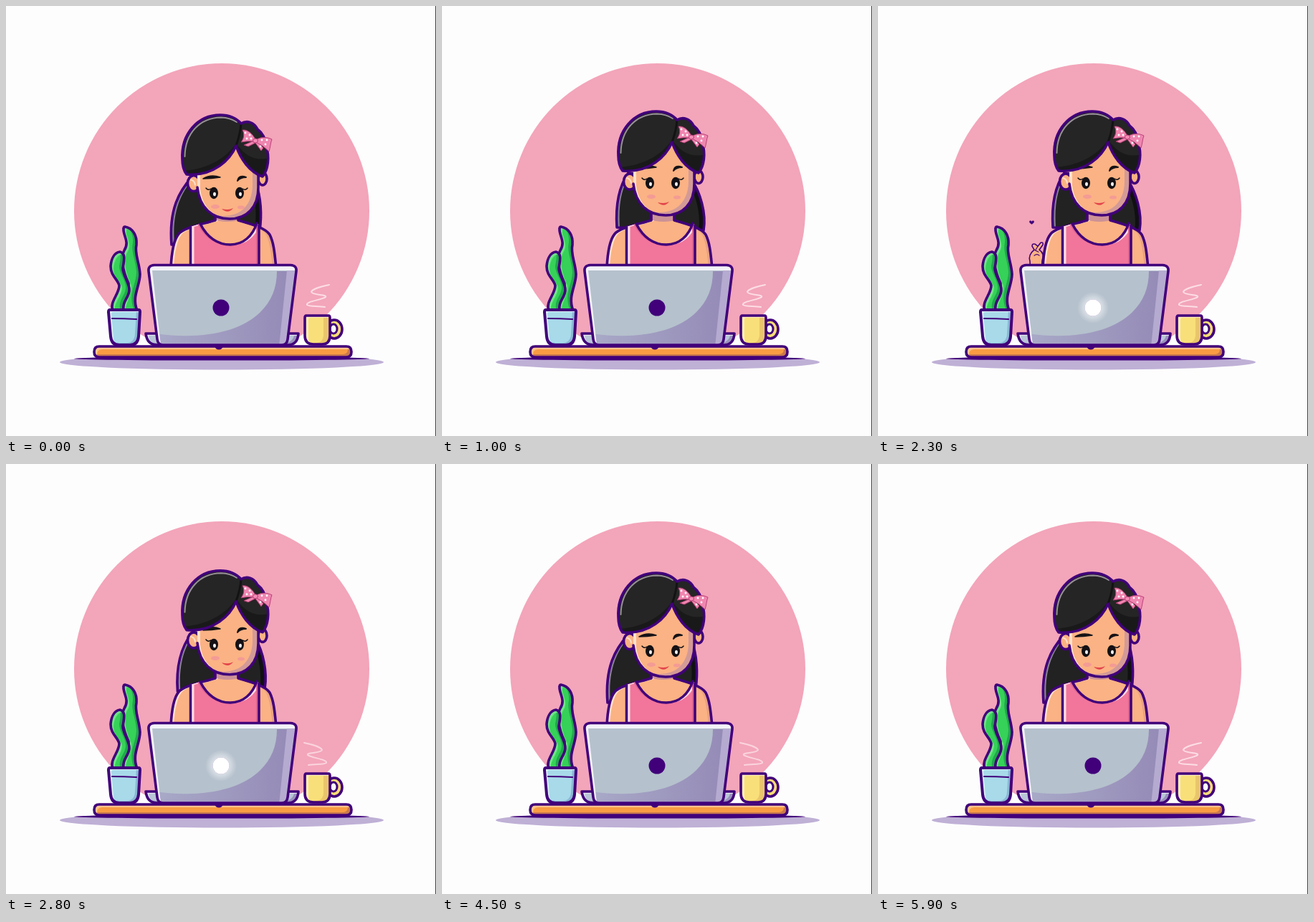
An HTML page with a canvas that plays this animation: 600 px wide and 600 px high, repeating every 6 s.

```html
<!DOCTYPE html>
<html lang="en">
<head>
<meta charset="utf-8">
<title>Working at the laptop</title>
<style>
html, body { margin: 0; width: 100%; height: 100%; overflow: hidden; background: #fdfdfd; }
canvas { display: block; width: 600px; height: 600px; }
</style>
</head>
<body>
<canvas id="stage" width="600" height="600"></canvas>
<script>
const ctx = document.getElementById('stage').getContext('2d');
const LOOP = 6000, STEP = 100;
const PAPER = '#fdfdfd', INK = '#41007a';
const SKIN = '#fbb284', SKIN_LIGHT = '#fee0cc', SKIN_SHADE = '#d39a97';

const ramp = (t, a, b) => Math.min(1, Math.max(0, (t - a) / (b - a)));
const ease = (t, a, b) => { const u = ramp(t, a, b); return u * u * (3 - 2 * u); };
const pulse = (t, a, b, c, d) => ease(t, a, b) - ease(t, c, d);

function shape(d, fill, stroke, width = 4) {
  const path = new Path2D(d);
  if (fill) { ctx.fillStyle = fill; ctx.fill(path); }
  if (stroke) { ctx.strokeStyle = stroke; ctx.lineWidth = width; ctx.stroke(path); }
}

function oval(x, y, rx, ry, fill, stroke, width = 4) {
  ctx.beginPath();
  ctx.ellipse(x, y, rx, ry, 0, 0, Math.PI * 2);
  if (fill) { ctx.fillStyle = fill; ctx.fill(); }
  if (stroke) { ctx.strokeStyle = stroke; ctx.lineWidth = width; ctx.stroke(); }
}

function group(dx, dy, draw) {
  ctx.save();
  ctx.translate(dx, dy);
  draw();
  ctx.restore();
}

function inside(d, draw) {
  ctx.save();
  ctx.clip(new Path2D(d));
  draw();
  ctx.restore();
}

// Fills the part of a shape that lies outside a shifted copy of itself.
function rim(d, color, dx, dy) {
  inside(d, () => {
    const outer = new Path2D('M0 0H600V600H0Z');
    outer.addPath(new Path2D(d), { e: dx, f: dy });
    ctx.fillStyle = color;
    ctx.fill(outer, 'evenodd');
  });
}

function solid(d, fill, light, shade, width = 4) {
  shape(d, fill);
  rim(d, shade, -5, -3);
  rim(d, light, 4, 3);
  shape(d, null, INK, width);
}

function backdrop() {
  ctx.fillStyle = PAPER;
  ctx.fillRect(0, 0, 600, 600);
  oval(301, 286, 206, 206, '#f3a5ba');
  oval(301, 497, 226, 10.5, '#bfb0d6');
  oval(301, 492, 206, 2.6, INK);
}

function desk() {
  const top = 'M130 475H475Q482 475 482 482.5Q482 490 475 490H130Q123 490 123 482.5Q123 475 130 475Z';
  shape(top, '#f99c43');
  rim(top, '#c9794e', -5, -4);
  rim(top, '#fdc48d', 4, 4);
  shape(top, null, INK, 3.6);
}

function plant() {
  const back = 'M166 308C177 310 183 320 182 333C179 346 186 357 187 374C187 391 175 405 183 425H162C163 410 172 399 171 387C162 368 160 350 165 341C173 329 163 320 164 311Q164 308 166 308Z';
  const front = 'M159 343C167 345 165 354 163 366C163 376 173 387 172 397C171 408 162 412 164 425H149C144 413 158 402 158 390C156 381 146 377 146 363C147 351 152 344 159 343Z';
  solid(back, '#36d158', '#72e488', '#20a84b', 3.6);
  solid(front, '#36d158', '#72e488', '#20a84b', 3.6);
  const pot = 'M145 424H185Q187 424 187 427L185 461Q184 473 173 473H158Q147 473 146 461L143 427Q143 424 145 424Z';
  solid(pot, '#a8daea', '#dff3f8', '#89b8d4');
  shape('M148 436Q165 436 182 437', null, INK, 2.2);
}

function mug() {
  oval(458, 451, 11, 13, '#f8dc78', INK, 3.6);
  oval(457, 450.5, 5, 6.5, PAPER, INK, 3);
  const cup = 'M419 432H450Q452 432 452 435V460Q452 472 441 472H429Q417 472 417 460V435Q417 432 419 432Z';
  shape(cup, '#f9df79');
  rim(cup, '#e9c56b', -9, -2);
  rim(cup, '#fff0b9', 5, 3);
  shape(cup, null, INK, 3.6);
}

function steam(t) {
  const phase = (t * 7 / LOOP) % 1;
  const mirrored = phase > 0.225 && phase < 0.6;
  ctx.save();
  if (mirrored) {
    ctx.translate(867, 0);
    ctx.scale(-1, 1);
  }
  ctx.globalAlpha = mirrored ? 0.75 : 0.9;
  shape('M451 389C441 391 427 395 426 399C428 404 448 402 446 406C442 410 418 412 420 417C424 420 436 418 445 420', null, '#fde4ea', 2);
  ctx.restore();
}

function laptop(t) {
  solid('M195 457H408Q407 473 393 473H211Q197 473 195 457Z', '#b8c5d6', '#e7edf3', '#9a91bc', 3.6);
  const lid = 'M207 361.5H397Q406 362 405 370L393 465Q392 473 385 473H219Q212 473 211 465L199 370Q198 362 207 361.5Z';
  shape(lid, '#b5c1cd');
  inside(lid, () => {
    const shadow = ctx.createLinearGradient(216, 0, 394, 0);
    shadow.addColorStop(0, '#a8a8c7');
    shadow.addColorStop(1, '#958bb7');
    shape('M209 457C270 466 326 456 355 427C370 412 378 394 378 370H410V480H209Z', shadow);
    shape('M196 360H408V369H204L216 473H208Z', '#f2f2f7');
    shape('M392 369H407L394 475H381Z', '#b5abd0');
  });
  shape(lid, null, INK, 3.6);

  const glow = pulse(t, 1600, 2200, 3400, 4200);
  oval(300, 421, 11.5, 11.5, INK);
  ctx.save();
  ctx.globalAlpha = glow;
  const halo = ctx.createRadialGradient(300, 421, 8, 300, 421, 22);
  halo.addColorStop(0, 'rgba(255,255,255,.65)');
  halo.addColorStop(1, 'rgba(255,255,255,0)');
  oval(300, 421, 22, 22, halo);
  oval(300, 421, 11.5, 11.5, '#fff');
  ctx.restore();
}

function hand(t) {
  const up = pulse(t, 1100, 1500, 2200, 2600);
  if (up > 0) group(0, 46 * (1 - up), () => {
    shape('M213 368L212 349C210 343 213 337 218 333L215 328Q215 324 219 325L223 328L227 323Q231 322 230 326L225 333C231 337 231 343 229 348L228 368Z', SKIN, INK, 1.6);
    shape('M218 333L224 336M223 328L220 333M218 341Q222 338 225 341', null, INK, 1.2);
  });
  const pop = pulse(t, 1400, 1650, 2150, 2400);
  if (pop > 0) group(214.5, 302, () => {
    ctx.scale(pop, pop);
    shape('M0 8C-5 4 -9.5 1 -9.5 -3C-9 -8 -2 -8 0 -3C2 -8 9 -8 9.5 -3C9.5 1 5 4 0 8Z', INK);
  });
}

function backHair(p) {
  const y = 5 * p;
  const d = `M260 ${233 + y}C${246 - 4 * p} ${253 + y} ${242 - 15 * p} ${278 + y} ${244 - 13 * p} ${309 + 24 * p}` +
    `L${365 - 11 * p} 313C${369 - 12 * p} ${288 + y} ${360 - 4 * p} ${260 + y} 348 ${242 + y}Z`;
  shape(d, '#222');
  rim(d, '#8a8392', 4, 0);
  rim(d, '#101012', -7, 0);
  shape(d, null, INK, 3.6);
}

function body() {
  const torso = 'M230 366C231 343 235 325 241 318C247 310 268 306 292 299V280H324V299C345 305 362 310 368 319C374 331 375 347 377 366Z';
  shape(torso, SKIN);
  rim(torso, '#e9a181', -5, 0);
  rim(torso, SKIN_LIGHT, 4, 1);
  inside(torso, () => oval(309, 287, 29, 14, '#cc9296'));
  shape(torso, null, INK, 3.6);
  const top = 'M257.5 366V308L271 304C281 323 295 333 313 333C331 333 344 321 350 303L353 306V366Z';
  shape(top, '#f2759b');
  rim(top, '#fbdde6', 5, 0);
  rim(top, '#d9658f', -4, 0);
  shape('M257.5 366V308M353 366V306M271 304C281 323 295 333 313 333C331 333 344 321 350 303', null, INK, 3.5);
}

function eye(x, side) {
  oval(x, 247, 6, 8.3, '#141014');
  oval(x + 1, 248.5, 1.9, 2.8, '#fff');
  shape(`M${x + side * 4} 241Q${x + side * 8} 244 ${x + side * 11} 240`, null, '#141014', 1.5);
}

function features(p) {
  group(0, 9 * p, () => {
    oval(292, 266, 6, 3, '#f49b95');
    oval(328, 267, 5, 2.5, '#f49b95');
    eye(290, -1);
    eye(326, 1);
    shape('M275 227Q286 220 299 225Q287 227 275 227Z', '#161316', '#161316', 1.5);
    shape('M323 230Q325 221 335 225Q327 225 323 230Z', '#161316', '#161316', 2);
  });
  group(0, 4 * p, () => shape('M301 274Q305 275 309 275Q313 275 317 273Q310 282 301 274Z', '#e3434b'));
}

function bow() {
  const left = 'M348 181C344 173 337 167 330 168C333 174 332 180 328 185Q337 183 346 184Z';
  const right = 'M350 181C358 177 365 178 371 181C369 186 369 192 367 198Q358 189 349 185Z';
  const tails = 'M346 183L332 189L338 191L348 186L356 197L359 193L351 184Z';
  for (const d of [tails, left, right]) shape(d, '#ef86b0', '#b23a73', 0.9);
  oval(348, 183, 3.5, 3, '#f58bb5', '#b23a73', 0.9);
  const dots = [[334, 172], [340, 175], [336, 180], [342, 180], [357, 182], [364, 182], [362, 188], [355, 191]];
  for (const [x, y] of dots) oval(x, y, 1.4, 1.4, '#fff');
}

function frontHair() {
  const hair = 'M246 209C244 174 267 147 299 147C311 147 321 151 328 159C336 154 346 157 351 167C359 173 362 181 363 190C368 206 366 223 358 233C340 227 327 208 321 190C313 209 290 233 252 230Q246 222 246 209Z';
  shape(hair, '#252525');
  inside(hair, () => {
    shape('M321 187C306 208 282 222 249 225V240H330Z', '#19191a');
    shape('M322 188C337 207 348 211 369 207V240H330Z', '#19191a');
    shape('M328 159Q327 173 321 190', null, '#131313', 3);
  });
  shape('M249.5 205C250 173 270 151 300 150.5Q313 151 322 157', null, '#999199', 2);
  shape(hair, null, INK, 3.6);
}

function head(p) {
  group(0, 2.5 * p, () => {
    oval(262, 245, 8.5, 11, SKIN, INK, 3.6);
    oval(358, 238.5, 6, 9, SKIN, INK, 3.6);
    shape('M258 240Q263 241 264 247', null, SKIN_LIGHT, 2);
  });
  group(0, 5 * p, () => {
    const face = 'M267 180V250C270 277 288 292 312 292C336 292 352 276 352 248V180Z';
    shape(face, SKIN);
    rim(face, SKIN_SHADE, -8, -4);
    rim(face, SKIN_LIGHT, 4, 0);
    shape('M267 248C270 277 288 292 312 292C336 292 352 276 352 248V220', null, INK, 3.5);
    features(p);
    frontHair();
    bow();
  });
}

function render(t) {
  // 0 = looking up, 1 = looking down at the screen
  const p = 1 - pulse(t, 100, 900, 2400, 3400);
  backdrop();
  backHair(p);
  hand(t);
  body();
  head(p);
  plant();
  steam(t);
  mug();
  desk();
  laptop(t);
  shape('M291 475H303Q301 479.5 297 479.5Q293 479.5 291 475Z', INK);
  ctx.fillStyle = '#444';
  ctx.fillRect(599, 0, 1, 600);
}

ctx.lineJoin = ctx.lineCap = 'round';
const start = performance.now();
function tick() {
  const elapsed = (performance.now() - start) % LOOP;
  render(Math.floor(elapsed / STEP) * STEP);
  requestAnimationFrame(tick);
}
tick();
</script>
</body>
</html>
```
